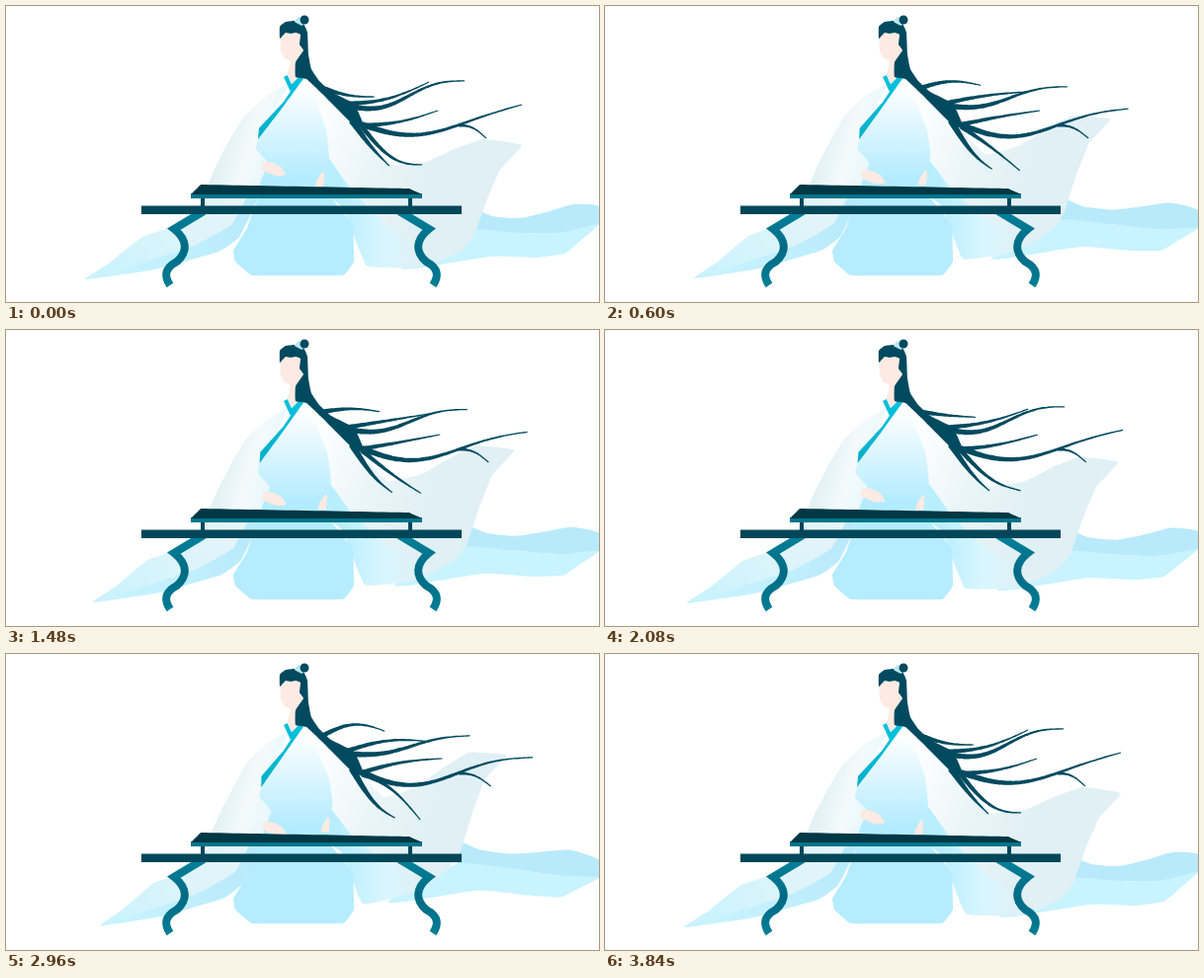
These frames come from a looping animation (600 px wide and 300 px high, 3.88 s). An HTML page with a canvas:

```html
<!DOCTYPE html>
<html lang="en">
<head>
<meta charset="utf-8">
<title>Zither player</title>
<style>
html, body { margin: 0; width: 100%; height: 100%; overflow: hidden; background: #fff; }
canvas { display: block; }
</style>
</head>
<body>
<canvas id="stage" width="600" height="300"></canvas>
<script>
const ctx = document.getElementById('stage').getContext('2d');
const LOOP = 3880, STEP = 40, SWING = 960;
const HAIR = '#004a5f', SKIN = '#fdeae3', MIST = '#e0f0f5', SKY = '#b8eafb', PALE = '#c8f3ff';

let sway = 0; // 0 = cloth hanging low, 1 = lifted by the wind

const clamp = v => Math.max(0, Math.min(1, v));
const blend = (low, high) => low + (high - low) * sway;

// How far the wind carries each point of a cloth at full sway.
const wind = {
  sleeve(x) {
    const k = clamp((x - 330) / 170) ** 0.85;
    return [-17 * k, -42 * k];
  },
  train(x) {
    const k = clamp((x - 480) / 120);
    return [-14 * (1 - k), -16 + 22 * k * k];
  },
  tail: x => [3 + 14 * clamp((250 - x) / 170), -2],
  robe: (x, y) => [4 * clamp((y - 90) / 50), 0],
  leftHand: () => [1, 13],
  rightHand: () => [6, -3]
};

function drift(points, rule) {
  const out = [];
  for (let i = 0; i < points.length; i += 2) {
    const [x, y] = [points[i], points[i + 1]];
    const [dx, dy] = rule(x, y);
    out.push(x + dx * sway, y + dy * sway);
  }
  return out;
}

function ramp(x0, y0, x1, y1, ...colors) {
  const g = ctx.createLinearGradient(x0, y0, x1, y1);
  colors.forEach((c, i) => g.addColorStop(i / (colors.length - 1), c));
  return g;
}

// Closed outline; bend 0 gives straight sides, 1 a full spline.
function shape(p, fill, bend = 0) {
  const n = p.length / 2, k = bend / 6;
  const at = i => { const j = (i + n) % n * 2; return [p[j], p[j + 1]]; };
  ctx.beginPath();
  ctx.moveTo(p[0], p[1]);
  for (let i = 0; i < n; i++) {
    const [a, b, c, d] = [at(i - 1), at(i), at(i + 1), at(i + 2)];
    ctx.bezierCurveTo(b[0] + (c[0] - a[0]) * k, b[1] + (c[1] - a[1]) * k,
      c[0] - (d[0] - b[0]) * k, c[1] - (d[1] - b[1]) * k, c[0], c[1]);
  }
  ctx.fillStyle = fill;
  ctx.fill();
}

// Tapered lock: a line from root to tip, bent by one arch (bow) and one S-curve (wave).
function lock({ root, tip, move, bow, wave = [0, 0], width = 6 }) {
  const arch = blend(...bow), ripple = blend(...wave);
  const dx = tip[0] + move[0] * sway - root[0];
  const dy = tip[1] + move[1] * Math.sin(sway * Math.PI / 2) - root[1];
  const left = [], right = [], count = 28;
  for (let i = 0; i <= count; i++) {
    const s = i / count, a = Math.PI * s;
    const x = root[0] + dx * s;
    const y = root[1] + dy * s + arch * Math.sin(a) + ripple * Math.sin(2 * a);
    const slope = dy + Math.PI * (arch * Math.cos(a) + 2 * ripple * Math.cos(2 * a));
    const len = Math.hypot(dx, slope), half = (1.2 + (width - 1.2) * (1 - s) ** 1.3) / 2;
    const nx = -slope / len * half, ny = dx / len * half;
    left.push(x + nx, y + ny);
    right.unshift(x - nx, y - ny);
  }
  shape([...left, ...right], HAIR);
}

function train() {
  const seam = [600, 221, 560, 230, 520, 230, 470, 227];
  shape(drift([470, 205, 492, 213, 520, 215, 550, 208, 574, 201, 600, 203, ...seam], wind.train), SKY, 0.6);
  shape(drift([400, 265, 470, 227, 520, 230, 560, 230, 600, 221,
    580, 239, 565, 251, 535, 255, 490, 254, 415, 266], wind.train), PALE, 0.4);
}

function leftSleeve() {
  shape(drift([80, 277, 104, 261, 138, 234, 178, 220, 215, 180, 258, 175, 250, 208, 236, 234, 215, 249, 150, 267],
    wind.tail), ramp(110, 265, 235, 190, '#ccf3fd', '#dcf4fa', '#e6f4f8'), 0.3);
  shape(drift([80, 277, 135, 261, 190, 243, 228, 222, 246, 190, 257, 190, 236, 234, 215, 249, 150, 267],
    wind.tail), ramp(110, 270, 245, 200, PALE, SKY), 0.3);
  shape(drift([286, 79, 262, 92, 241, 112, 225, 138, 212, 163, 203, 190, 260, 190, 268, 158, 258, 130],
    wind.robe), ramp(212, 145, 277, 163, '#deeff4', '#f4fafb', '#e3f7fd'), 0.3);
}

function rightSleeve() {
  shape(drift([301, 75, 330, 102, 363, 132, 389, 161, 425, 158, 454, 145, 483, 135, 522, 141, 500, 166,
    486, 198, 474, 232, 462, 247, 441, 258, 414, 265, 365, 263, 340, 205, 322, 185], wind.sleeve),
    ramp(312, 130, 430, 175, '#fcfefe', '#eaf5f8', MIST), 0.3);
  shape(drift([326, 154, 352, 190, 389, 226, 431, 252, 414, 265, 365, 263, 342, 205, 320, 188], wind.sleeve),
    ramp(340, 230, 422, 228, '#b9eeff', '#d8f6fe', MIST), 0.25);
}

function body() {
  shape([257, 192, 326, 192, 340, 208, 351, 223, 352, 259, 341, 273, 249, 273, 232, 259, 230, 248, 244, 225],
    '#b5ecff', 0.15);
  shape(drift([299, 75, 314, 98, 324, 125, 327, 153, 321, 180, 326, 198, 257, 198, 257, 180, 265, 159,
    253, 145, 257, 128, 279, 101], wind.robe), ramp(0, 82, 0, 174, '#fff', '#d9f5ff', '#b3ecff'), 0.25);
  const collar = ramp(260, 130, 298, 73, '#00b0cb', '#00c2de');
  shape([281, 72, 285, 70, 289, 79, 296, 70, 301, 74, 288, 87], collar);
  shape(drift([297, 73, 300, 75, 279, 104, 255, 135, 256, 124, 281, 97], wind.robe), collar);
  shape(drift([260, 158, 270, 159, 278, 163, 283, 171, 273, 172, 259, 166], wind.leftHand), SKIN, 0.5);
  shape(drift([313, 183, 315, 176, 320, 168, 322, 170, 321, 183], wind.rightHand), SKIN, 0.4);
}

function head() {
  shape([278, 27, 301, 27, 301, 47, 294, 55, 295, 73, 289, 79, 285, 70, 288, 56, 282, 53, 278, 45], SKIN, 0.25);
  shape([277, 33, 277, 21, 283, 16, 293, 15, 301, 18, 305, 27, 306, 49, 309, 64, 317, 76, 329, 87,
    352, 99, 362, 121, 352, 121, 320, 89, 304, 74, 293, 72, 293, 57, 301, 45, 297, 39, 298, 29,
    293, 27, 288, 28, 283, 27, 280, 30], HAIR, 0.35);
  shape([292, 16, 296, 11, 301, 15, 300, 20], '#b9e6f1', 0.4);
  ctx.beginPath();
  ctx.ellipse(302, 14, 4.5, 4.5, 0, 0, 2 * Math.PI);
  ctx.fillStyle = HAIR;
  ctx.fill();
}

function locks() {
  lock({ root: [320, 83], tip: [373, 92], move: [11, -14], bow: [3, -10], width: 5 });
  lock({ root: [343, 99], tip: [428, 77], move: [1, 12], bow: [6, -7], width: 5 });
  lock({ root: [346, 101], tip: [464, 76], move: [6, 7], bow: [4, 2], wave: [6, 3] });
  lock({ root: [357, 121], tip: [437, 106], move: [5, 0], bow: [4, -4], width: 5 });
  lock({ root: [360, 120], tip: [522, 100], move: [12, 5], bow: [16, 12], wave: [4, 8] });
  lock({ root: [458, 121], tip: [486, 134], move: [5, 0], bow: [-4, -4], width: 3 });
  lock({ root: [360, 122], tip: [421, 161], move: [-2, 7], bow: [12, -10], width: 5 });
  lock({ root: [350, 116], tip: [388, 162], move: [6, 4], bow: [3, 9], width: 7 });
}

function leg() {
  ctx.beginPath();
  ctx.moveTo(200, 208);
  ctx.lineTo(170, 226);
  ctx.bezierCurveTo(185, 238, 183, 250, 173, 259);
  ctx.bezierCurveTo(160, 266, 160, 274, 166, 283);
  ctx.lineWidth = 8;
  ctx.strokeStyle = ramp(0, 211, 0, 283, '#007f98', '#006a84', '#007d95');
  ctx.stroke();
}

function table() {
  leg();
  ctx.save();
  ctx.translate(598, 0);
  ctx.scale(-1, 1);
  leg();
  ctx.restore();
  ctx.fillStyle = '#00475a';
  ctx.fillRect(197, 194, 4, 9);
  ctx.fillRect(407, 194, 4, 9);
  ctx.fillRect(137, 202.5, 324, 8.5);
  ctx.fillStyle = '#00758b';
  ctx.fillRect(187, 190, 234, 5);
  shape([197, 181, 408, 185, 421, 191, 187, 191], '#003845');
}

function draw(elapsed) {
  const time = Math.floor(elapsed % LOOP / STEP) * STEP;
  sway = 1 - Math.abs(1 - time / SWING % 2);
  ctx.fillStyle = '#fff';
  ctx.fillRect(0, 0, 600, 300);
  [train, leftSleeve, rightSleeve, body, head, locks, table].forEach(part => part());
}

const start = performance.now();
function tick() {
  draw(performance.now() - start);
  requestAnimationFrame(tick);
}
tick();
</script>
</body>
</html>
```
